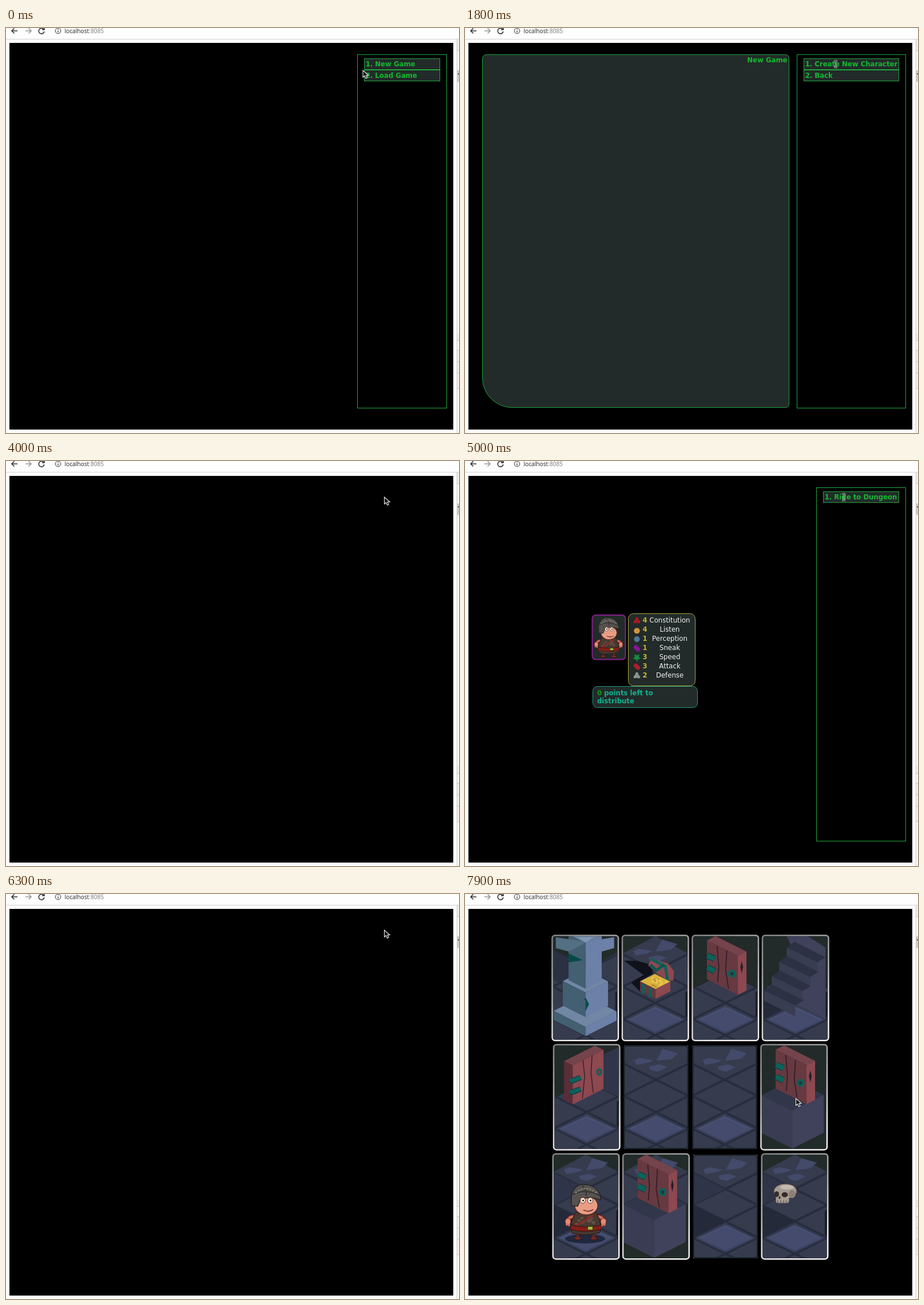
These frames come from a looping animation (792 px wide and 707 px high, 8 s). An HTML page:

```html
<!DOCTYPE html>
<html lang="en">
<head>
<meta charset="utf-8">
<title>Dungeon game</title>
<style>
  html, body { margin: 0; width: 100%; height: 100%; overflow: hidden; background: #fff; }
  svg { display: block; }
  text { font: 11.7px "DejaVu Sans", sans-serif; white-space: pre; }
  .b { font-weight: bold; }
  .green { fill: #13b92f; }
  .line { fill: none; stroke: #1fa53b; }
  .box { fill: #222b29; stroke: #1fa53b; }
  .url { font: 10.2px "Open Sans", sans-serif; fill: #222; }
  .scene { display: none; }
</style>
</head>
<body>
<svg width="792" height="707" viewBox="0 0 792 707">
  <defs>
    <linearGradient id="rim" x1="0" y1="0" x2=".35" y2="1">
      <stop offset="0" stop-color="#858585"/><stop offset=".55" stop-color="#b5b5b5"/><stop offset="1" stop-color="#f4f4f4"/>
    </linearGradient>
    <g id="hero"></g>
  </defs>
  <rect width="792" height="707" fill="#fefefe"/>
  <path d="M0 19.5H792" stroke="#d2d2d2"/>
  <g fill="none" stroke="#333" stroke-width="1.6">
    <path id="back" d="M20 5H10M14.5 .5L10 5L14.5 9.5"/>
    <use href="#back" transform="translate(54 0) scale(-1 1)" opacity=".5"/>
    <path d="M66 2.5A4.8 4.8 0 1 0 66.800 6M67 -1V3H63"/>
    <path d="M91 4.500V8M91 2V3.200" stroke-width="1.200"/><circle cx="91" cy="5" r="4.800" stroke-width="1"/>
  </g>
  <text class="url" x="102.500" y="9">localhost<tspan fill="#777">:8085</tspan></text>
  <path d="M789 20h3v19h-3zM789 533h3v12h-3zM789 562h3v40h-3z" fill="#f1f1f1"/>
  <path d="M789 74h3v20h-3z" fill="#ccc"/><path d="M790 80h2" stroke="#555" stroke-width="2"/>
  <path d="M789 603h3v26h-3z" fill="#fdeeee"/>
  <path d="M788.500 20V707M789 39.500h3m-3 506h3m-3 17h3m-3 20h3m-3 20h3m-3 27h3" stroke="#c6c6c6"/>
  <rect x="6" y="26" width="776" height="675"/>
  <g id="scenes"></g>
  <path id="arrow" d="M0 0V12L3 9.500L5 14L7.500 13L5.500 8.500H9.500Z" fill="#111" stroke="#e8e8e8" stroke-width="1.100"/>
  <g id="beam" fill="none" stroke="#ddd" stroke-width="2.600">
    <path id="bar" d="M-3 -5.500H-1L0 -4.500L1 -5.500H3M0 -4.500V4.500M-3 5.500H-1L0 4.500L1 5.500H3"/>
    <path d="M0 -5V5M-3 -5.500H3M-3 5.500H3" stroke="#222" stroke-width="1"/>
  </g>
</svg>
<script>
const $ = id => document.getElementById(id);
const loop = (n, fn) => Array.from({ length: n }, (_, i) => fn(i)).join('');
const poly = (points, fill) => `<polygon points="${points}" fill="${fill}"/>`;
const oval = (x, y, rx, ry, fill, stroke = 'none') =>
  `<ellipse cx="${x}" cy="${y}" rx="${rx}" ry="${ry}" fill="${fill}" stroke="${stroke}"/>`;
const stroke = (d, color, width = 1) => `<path d="${d}" fill="none" stroke="${color}" stroke-width="${width}"/>`;
const rect = (x, y, r, b, attrs) =>
  `<rect x="${x + .5}" y="${y + .5}" width="${r - x}" height="${b - y}" ${attrs}/>`;
const diamond = (x, y, rx, ry, fill) => poly([x - rx, y, x, y - ry, x + rx, y, x, y + ry], fill);

// Isometric block standing on its front corner (x, y)
function prism(x, y, l, r, h, [top, left, right]) {
  const t = y - h;
  return poly([x, t, x + r, t - r / 2, x + r - l, t - (r + l) / 2, x - l, t - l / 2], top) +
    poly([x, t, x, y, x - l, y - l / 2, x - l, t - l / 2], left) +
    poly([x, t, x, y, x + r, y - r / 2, x + r, t - r / 2], right);
}

let seed = 7;
const random = () => (seed = seed * 16807 % 2147483647) / 2147483647;

// Menus, panels and the character sheet
function menu(x, ...items) {
  return rect(x, 46, 770, 663, 'class="line"') + items.map((label, i) => {
    const y = 53 + i * 20;
    return rect(x + 12, y, 758, y + 19, 'class="box"') +
      `<text class="b green" x="${x + 14.7}" y="${y + 14}">${i + 1}. ${label}</text>`;
  }).join('');
}

function panel(top, right, title) {
  return `<path class="box" d="M38.5 ${top + .5}H${right - 6.5}q7 0 7 7V655.5q0 7 -7 7H82.5a52 52 0 0 1 -52 -52V${top + 8.5}q0 -8 8 -8Z"/>
    <text class="b green" x="${right - 2.5}" y="${top + 14}" text-anchor="end">${title}</text>`;
}

const stats = [
  ['Constitution', 4, '#a91820', 3], ['Listen', 4, '#d2933d', 1], ['Perception', 1, '#50799b', 0],
  ['Sneak', 1, '#85149b', 2], ['Speed', 3, '#16883a', 5], ['Attack', 3, '#a92028', 2], ['Defense', 2, '#8d9190', 3]
];

// Small round badge with the given number of lobes
function badge(x, y, lobes, fill) {
  return poly(Array.from({ length: 36 }, (_, i) => {
    const a = i * Math.PI / 18, r = 5 - (lobes && 1.4 * Math.sin(lobes * a));
    return [(x + r * Math.cos(a)).toFixed(1), (y - r * Math.sin(a)).toFixed(1)];
  }), fill);
}

function sheet(dx, dy) {
  const rows = stats.map(([name, n, color, lobes], i) => {
    const y = 166 + i * 16;
    return badge(295.5, y + 1, lobes, color) +
      `<text class="b" x="305.5" y="${y + 4}" fill="#c2b335">${n}</text>
      <text x="353" y="${y + 4}" text-anchor="middle" fill="#f2f2f2">${name}</text>`;
  }).join('');
  return `<g transform="translate(${dx} ${dy})">
    <rect x="217.5" y="157" width="58" height="77.5" rx="6" fill="#222b29" stroke="#84208a" stroke-width="2"/>
    <use href="#hero" transform="translate(246 196) scale(.69 .72)"/>
    ${rect(280, 154, 397, 280, 'rx="9" fill="#222b29" stroke="#a9a63a"')}
    ${rect(218, 281, 401, 318, 'rx="8" fill="#222b29" stroke="#1a9c80"')}
    ${rows}
    <text class="b" x="226" y="297" fill="#12b291"><tspan fill="#158f22">0</tspan> points left to</text>
    <text class="b" x="226" y="311" fill="#12b291">distribute</text></g>`;
}

const limbs = [-1, 1].map(s => `<g transform="scale(${s} 1)">` +
  oval(14, 46, 6, 3, '#7a2a24', '#2a1010') + stroke('M14 36V45', '#6e2420', 4) +
  stroke('M20 8Q29 9 31 15', '#6b1712', 8) + stroke('M21 8Q29 9 31 14', '#c9705f', 5) +
  oval(31, 17, 5, 6, '#e58a74', '#6b1712') + stroke('M29 20v5m4 -5v4', '#d87865', 3) + '</g>').join('');
$('hero').innerHTML = limbs +
  '<path d="M-17 0Q0 8 18 0Q30 22 25 36Q0 44 -24 37Q-30 20 -17 0Z" fill="#49382f" stroke="#241713"/>' +
  loop(14, () => oval(-16 + 32 * random(), 8 + 14 * random(), 3, 2, '#5f5145')) +
  stroke('M13 6L-20 26', '#8b2b22', 3) + stroke('M-26 27Q0 33 27 27', '#35100e', 9) +
  stroke('M-26 27Q0 33 27 27', '#831f1b', 7) + rect(3, 25, 12, 31, 'fill="#9bbd43" stroke="#40300f"') +
  oval(1, -11, 20, 16, '#e99c84', '#70251d') +
  '<path d="M-25 -11V-28Q-20 -48 -4 -48Q20 -48 26 -27V-21Q6 -28 -9 -22L-14 -10Z" fill="#55524f" stroke="#252321" stroke-width="1.5"/>' +
  stroke('M-23 -30Q0 -42 25 -28M-6 -46Q2 -38 1 -28', '#353331', 2) +
  loop(8, i => oval(-17 + i * 5, -34 - 7 * Math.sin(i / 7 * Math.PI), 2, 1.3, '#817c75')) +
  [-5, 8].map(x => oval(x, -20, 4.5, 5, '#f5ead9', '#683126') + oval(x + .5, -20, 1.5, 1.5, '#111')).join('') +
  stroke('M-4 -3Q6 1 13 -4', '#5c211b', 1.4);

// Dungeon pieces, in the coordinates of one card
const W = 113, H = 181, MID = W / 2;
const dark = '#222b29', stone = ['#31364a', '#393c52', '#40415b'], marble = ['#7187a4', '#435f72', '#6c80a8'];
const wood = ['#75434b', '#673940', '#8d4850'], teal = '#0b625a';
const voidWall = poly([0, 0, W, 0, W, 92, MID, 64, 0, 92], dark);

function floor(rim) {
  const joints = loop(3, i => {
    const y = 60 + i * 56.5;
    return `M0 ${y - 28}L${MID} ${y}L${W} ${y - 28}M0 ${y + 28}L${MID} ${y}L${W} ${y + 28}`;
  });
  return `<rect width="${W}" height="${H}" fill="#363b4e"/>` + stroke(joints, '#282d3e', 4) +
    (rim ? poly([0, 0, MID, 0, 0, 30], dark) + poly([W, 0, MID, 0, W, 30], dark) +
      poly([W, 96, W - 4, 98, W - 4, 140, W, 142], '#1b2028') : '') +
    poly('18,26 28,22 51,26 44,30 22,34', '#434a6a') + poly('57,27 68,6 95,14 84,24', '#434a6a') +
    poly('44,37 62,33 76,38 59,46 47,43', '#434a6a') +
    diamond(MID, 146, 52, 25, '#39405c') + diamond(MID, 146, 46, 21.5, '#444b6d') +
    stroke(`M${MID - 46} 146L${MID} 124.5L${MID + 46} 146`, '#566083');
}

function door() {
  return prism(78.3, 102.5, 54, 15, 68, wood) +
    stroke('M42 17l3 36l-2 27M59 25l-2 35l5 32', '#301e2a', 1.7) + diamond(85, 54, 2.5, 11, '#2b2028') +
    [34, 55].map(y => stroke(`M25 ${y}l13 6`, '#123338', 11) + stroke(`M25 ${y}l13 6`, teal, 9)).join('') +
    `<circle cx="68" cy="65.5" r="5" fill="#26343a" stroke="${teal}" stroke-width="4"/>`;
}

function sideDoor() {
  return prism(32, 103, 15, 54, 68, [wood[0], '#5b2e37', wood[2]]) +
    stroke('M50 26l3 28l-4 39M66 17l-2 31l4 35', '#42242e', 1.7) +
    [57, 77].map(y => stroke(`M27 ${y + 3}l4 2l15 -6`, '#123338', 9) + stroke(`M27 ${y + 3}l4 2l15 -6`, teal, 7)).join('') +
    `<ellipse cx="78.5" cy="46.5" rx="4" ry="5" fill="#70404a" stroke="${teal}" stroke-width="3"/>`;
}

function pillar() {
  return poly([0, 0, W, 0, W, 28, MID, 60, 0, 28], dark) + poly([0, 24, 28, 38, 28, 88, 0, 76], '#2b3043') +
    prism(57.3, 174.5, 56, 54, 16, marble) + prism(57.3, 141.500, 40, 39, 43, marble) +
    prism(57.3, 92, 30, 28, 80, marble) +
    poly('5,2 57,10 57,11 28,27 5,21', '#536f84') + poly('57,10 107,2 107,21 85,27', marble[2]) +
    poly('5,2 107,2 70,2 57,11 44,2', '#8297b6') +
    poly('27,30 52,42 27,46', '#064a48') + diamond(57, 119, 6, 12, '#064a48') +
    poly('51,107 57,113 57,132 51,119', marble[1]);
}

function chest() {
  return poly('2,43 24,43 50,50 52,66 30,78 30,97 14,81 36,68', '#10121b') +
    poly('44,51 50,39 79,48 89,61 88,77 80,78 60,66', wood[2]) +
    stroke('M49 40L74 53L78 78', teal, 5) + stroke('M48 50L58 60L72 50', '#0b5650', 5) +
    prism(56.8, 109.5, 27, 26, 17, ['#d9b33c', '#6c343d', wood[2]]) +
    [35, 48].map(x => stroke(`M${x} ${81 + (x - 30) / 2}v17`, teal, 6)).join('') +
    loop(18, i => {
      const u = random(), v = random();
      return oval(57 + (u - v) * 22, 80 + (u + v - 1) * 10, 2.2, 1.8, i % 3 ? '#ecca52' : '#b98b2c');
    });
}

function stairs() {
  const wallFoot = x => 117.5 + (x - 54) / 2;
  return voidWall + poly([41, 0, 78, 0, W - 4, 20, W - 4, 60, 60, 40], stone[2]) + loop(4, i => {
    const x = 41 - 13 * i, y = 20 + 25 * i, a = x + 54, b = a + 14;
    return poly([a, y + 26, b, y + 18, b, wallFoot(b), a, wallFoot(a)], stone[2]) +
      poly([x, y, x + 14, y - 10, b, y + 17, a, y + 26], '#2c3144') +
      poly([x, y, a, y + 26, a, y + 45, x, y + 18], '#383d51');
  });
}

const cube = () => poly([0, 86, MID, 114, W, 86, W, H, 0, H], dark) + prism(53.5, 180, 54, 55, 66, stone);
const shade = () => poly([0, 88, MID, 116, 0, 144], '#252a3b') + poly([0, 32, MID, 60, 0, 88], '#2f3448');

function skull() {
  return oval(40, 64, 20, 13, '#a69b91', '#4d443f') + rect(23, 70, 46, 84, 'rx="4" fill="#a69b91"') +
    oval(43, 57, 12, 4, '#c5bab0') + oval(52, 69, 6, 7, '#8c8077') +
    oval(25, 69, 4, 5, '#352c2a') + oval(39, 70, 5.5, 4.5, '#352c2a') + diamond(30, 75, 2, 3, '#352c2a') +
    loop(4, i => stroke(`M${27 + i * 5} 80v5`, '#4d443f'));
}

const heroArt = () => oval(55, 147, 35, 8, '#20283f') + '<use href="#hero" x="56" y="100"/>';
const nook = () => poly([86, 16, W, 3, W, 90, 86, 78], '#30354a');

// Each row lists what stands on its cards; an empty list is a card without a rim
const rows = [
  [[pillar], [chest], [() => voidWall, door], [shade, stairs]],
  [[() => voidWall, nook, sideDoor], [], [], [() => voidWall, cube, door]],
  [[shade, heroArt], [cube, door], [shade], [shade, skull]]
];

function dungeon(filled) {
  return rows.map((row, r) => {
    const plain = art => !art.length || art.length === 1 && art[0] === shade;
    const widths = row.map(art => plain(art) ? 120 : 122.5);
    let x = 394 - widths.reduce((a, b) => a + b) / 2;
    return row.map((art, i) => {
      const rim = !plain(art), left = x + (rim ? 4.75 : 3.5);
      x += widths[i];
      const fixed = [shade, cube];
      const pieces = art.filter(fn => filled || fixed.includes(fn)).map(fn => fn()).join('');
      const edge = rim ? 1.25 : -1;
      return `<g transform="translate(${left} ${73.5 + r * 190.7})">
        <svg width="${W}" height="${H}">${floor(rim)}${pieces}</svg>
        <rect x="${-edge}" y="${-edge}" width="${W + 2 * edge}" height="${H + 2 * edge}" rx="5" fill="none"
          stroke="${rim ? 'url(#rim)' : '#1c2429'}" stroke-width="${rim ? 2.5 : 2}"/></g>`;
    }).join('');
  }).join('');
}

const scenes = {
  home: menu(614, 'New Game', 'Load Game'),
  blank: '',
  newEmpty: panel(46, 600, 'New Game') + menu(614),
  newGame: panel(46, 566, 'New Game') + menu(580, 'Create New Character', 'Back'),
  sheet: sheet(84, 112),
  points: sheet(3, 112) + menu(608, 'Distribute Points', 'Back'),
  ready: sheet(5, 112) + menu(614, 'Ride to Dungeon'),
  rideEmpty: panel(46, 600, 'Ride to Dungeon') + menu(614),
  ride: sheet(0, 0) + panel(432, 588, 'Ride to Dungeon') + menu(602, 'Go inside dungeon', 'Save Game'),
  floors: dungeon(false),
  dungeon: dungeon(true)
};
$('scenes').innerHTML = Object.entries(scenes)
  .map(([id, art]) => `<g class="scene" id="${id}">${art}</g>`).join('');

// Start, scene, and the time from which the pointer is a text beam
const cuts = [
  [0, 'home', 1200], [1400, 'blank'], [1500, 'newEmpty'], [1800, 'newGame', 1800],
  [2400, 'newEmpty'], [2500, 'blank'], [2700, 'sheet'], [3200, 'points', 3700],
  [4000, 'blank'], [4200, 'sheet'], [4500, 'ready', 5000], [5300, 'rideEmpty'],
  [5500, 'ride', 5500], [6300, 'blank'], [6400, 'floors'], [6500, 'dungeon']
];
// First and last step of each pointer move, and where it ends
const glides = [
  [300, 400, 599, 59], [600, 800, 661, 62], [1200, 1200, 647.5, 63],
  [1900, 1900, 661, 69], [2100, 2200, 661.5, 63], [7700, 7900, 578.5, 357]
];

function pointer(t) {
  let x = 624, y = 74;
  for (const [from, to, px, py] of glides) {
    if (t < from) break;
    const p = Math.min(1, (Math.floor(t / 100) * 100 - from + 100) / (to - from + 100));
    x += (px - x) * p;
    y += (py - y) * p;
  }
  return [x, y];
}

let shown;
function draw(t) {
  const [, id, beamFrom = Infinity] = cuts.findLast(cut => cut[0] <= t);
  if (id !== shown) {
    if (shown) $(shown).style.display = 'none';
    $(id).style.display = 'inline';
    shown = id;
  }
  const [x, y] = pointer(t), beam = t >= beamFrom && Math.abs(y - 63) < .1;
  $('beam').style.display = beam ? 'inline' : 'none';
  $('arrow').style.display = beam ? 'none' : 'inline';
  $(beam ? 'beam' : 'arrow').setAttribute('transform', `translate(${beam ? x + .5 : x} ${y})`);
}
const start = performance.now();
function tick() {
  draw((performance.now() - start) % 8000);
  requestAnimationFrame(tick);
}
tick();
</script>
</body>
</html>
```
